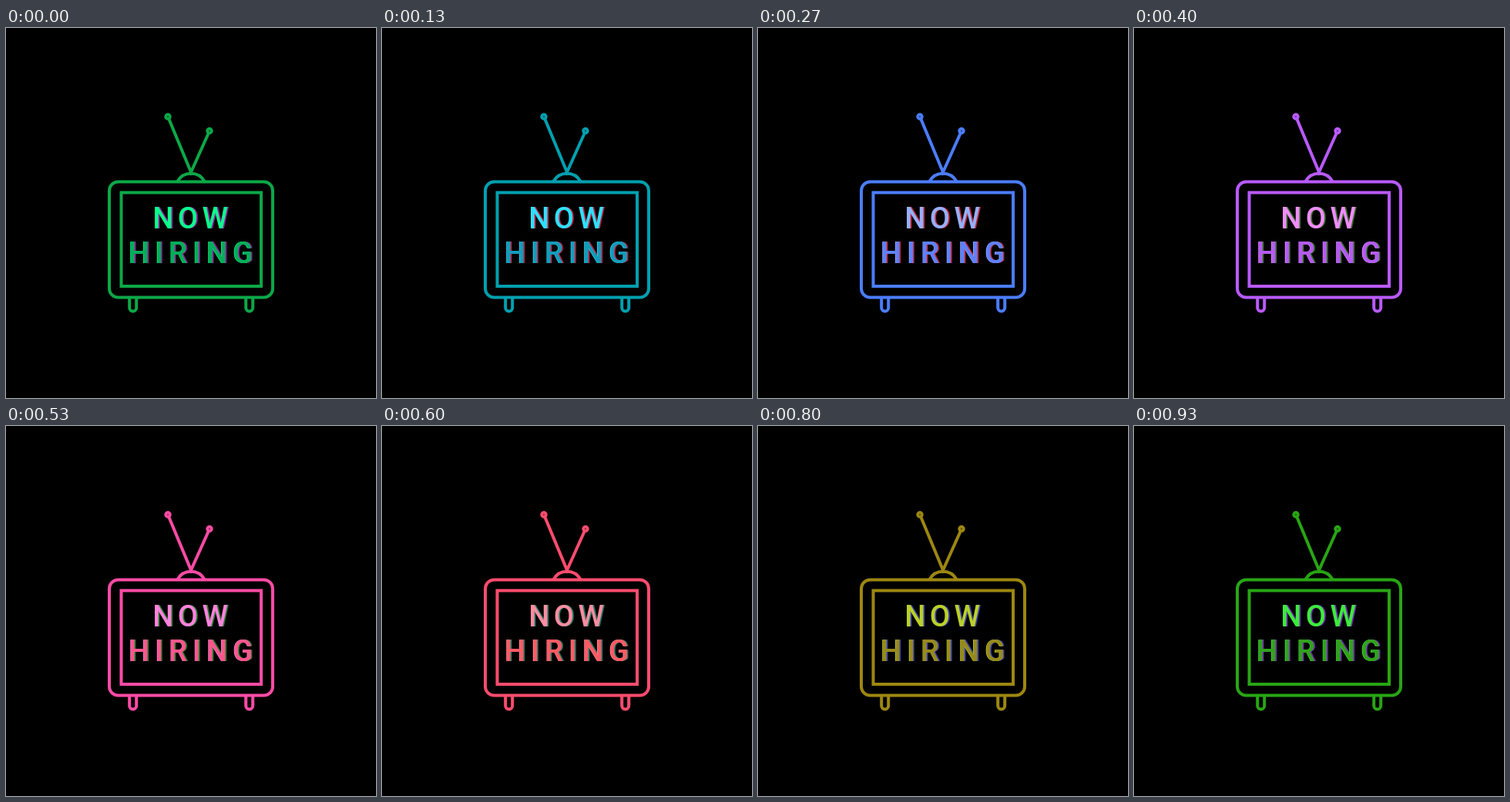
Recreate the animation shown at these times as an HTML page. Size 480x480 px, loop 0.99 s.

```html
<!DOCTYPE html>
<html lang="en">
<head>
<meta charset="utf-8">
<title>Now hiring</title>
<style>
  html, body { margin: 0; width: 100%; height: 100%; overflow: hidden; background: #000; }
  svg { display: block; width: 100vw; height: 100vh; }
  .tv { fill: none; stroke: var(--line); stroke-width: 4; stroke-linecap: round; }
  text { font: 500 38px Roboto, sans-serif; }
  .now { letter-spacing: 5.5px; }
  .hiring { letter-spacing: 7.2px; }
  .shade { fill: var(--shade); }
  .top { fill: var(--top); }
  .bottom { fill: var(--bottom); }
</style>
</head>
<body>
<svg viewBox="0 0 480 480">
  <defs>
    <text id="now" class="now" x="190.3" y="259.5">NOW</text>
    <text id="hiring" class="hiring" x="159.2" y="304.5">HIRING</text>
  </defs>
  <g class="tv">
    <rect x="134" y="199.5" width="212" height="150" rx="11.5"/>
    <rect x="149.5" y="213.5" width="181.5" height="121.5"/>
    <path d="M222.5 199A20 20 0 0 1 257.5 199"/>
    <path d="M211.5 118.5L240 187L262.5 137"/>
    <circle cx="210" cy="115" r="2.7"/>
    <circle cx="264" cy="133.5" r="2.7"/>
    <path id="leg" d="M160.2 351V363a4.5 4.5 0 0 0 9 0V351"/>
    <use href="#leg" x="151"/>
  </g>
  <g class="shade" transform="translate(1.7 .8)">
    <use href="#now"/>
    <use href="#hiring"/>
  </g>
  <use class="top" href="#hiring" x="-.6"/>
  <use class="top" href="#now"/>
  <use class="bottom" href="#hiring"/>
</svg>
<script>
const LOOP = 990, STEPS = 15;
const parts = ['line', 'top', 'bottom', 'shade'];

// step: colours of the parts, blended for the steps in between
const keys = [
  [0, '0ca848 0aff8c 00ad58 961ea0'],
  [2, '00a0af 2de1ff 149bb9 be1e41'],
  [4, '4b7dff 96afff 5f80ff be2832'],
  [6, 'b95aff f08cff b45af5 326e1e'],
  [8, 'ff4ba5 ff82dc ff558c 1e7828'],
  [9, 'ff4c6e ff8ca0 ff5a64 1e7864'],
  [10, 'f55f37 ff9b5a eb6e3c 1e6e96'],
  [11, 'd7780f fac31e c87d1e 1e50aa'],
  [14, '28a514 3ceb3c 32a01e 7328b4'],
  [15, '0ca848 0aff8c 00ad58 961ea0']
].map(([step, list]) => ({
  step,
  colours: list.split(' ').map(hex => [0, 2, 4].map(i => parseInt(hex.slice(i, i + 2), 16)))
}));

const startOf = step => Math.round(step * 20 / 3) * 10;
const root = document.documentElement.style;
let shown = -1;

function paint(step) {
  const n = keys.findIndex(key => key.step > step);
  const from = keys[n - 1], to = keys[n];
  const mix = (step - from.step) / (to.step - from.step);
  parts.forEach((part, p) => {
    const rgb = from.colours[p].map((v, i) => Math.round(v + (to.colours[p][i] - v) * mix));
    root.setProperty('--' + part, `rgb(${rgb})`);
  });
}

const begin = performance.now();
function tick() {
  const time = (performance.now() - begin) % LOOP;
  let step = STEPS - 1;
  while (startOf(step) > time) step--;
  if (step !== shown) paint(shown = step);
  requestAnimationFrame(tick);
}
tick();
</script>
</body>
</html>
```
